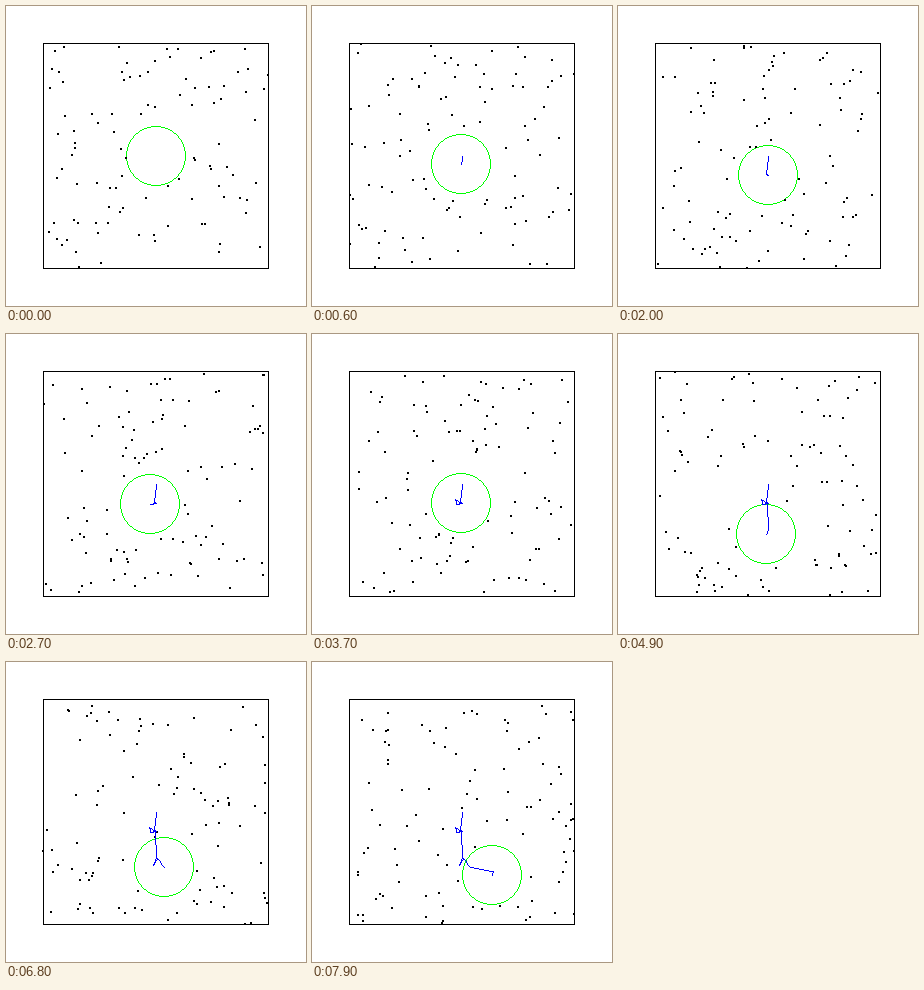
Write a matplotlib script that moves like this. It is 300x300 px and loops after 8000 ms.

```python
import matplotlib.pyplot as plt
import numpy as np
from matplotlib.animation import FuncAnimation
from matplotlib.collections import PolyCollection

SIZE, FRAMES, INTERVAL = 300, 80, 100
LOW, HIGH = 37, 262          # walls of the box
RADIUS, COUNT, SPEED, SUBSTEPS = 30, 100, 3.2, 6

# Main turns of the disc: step, x, y
TURNS = np.array([
    (0, 150, 150), (13, 148, 168), (20, 150, 169), (27, 144, 170),
    (31, 143, 165), (37, 149, 169), (46, 150, 196), (51, 147, 203),
    (60, 151, 196), (68, 158, 205), (77, 181, 209), (79, 180, 213)])


def disc_at(step):
    times, xs, ys = TURNS.T
    return np.array([np.interp(step, times, xs), np.interp(step, times, ys)])


def simulate():
    """Point particles bouncing off the walls and the moving disc."""
    rng = np.random.default_rng(11)
    pos = rng.uniform(LOW, HIGH, (4 * COUNT, 2))
    pos = pos[np.hypot(*(pos - disc_at(0)).T) > RADIUS][:COUNT]
    vel = rng.normal(0, SPEED, (COUNT, 2))
    history = [pos.copy()]
    dt = 1 / SUBSTEPS
    for i in range(1, (FRAMES - 1) * SUBSTEPS + 1):
        pos = pos + vel * dt
        center = disc_at(i * dt)
        drift = (center - disc_at((i - 1) * dt)) / dt
        offset = pos - center
        dist = np.hypot(*offset.T)
        normal = offset / dist[:, None]
        hit = dist < RADIUS
        pos[hit] = center + normal[hit] * RADIUS
        approach = ((vel - drift) * normal).sum(axis=1)
        bounce = hit & (approach < 0)
        vel[bounce] -= 2 * approach[bounce, None] * normal[bounce]
        vel[pos < LOW] = np.abs(vel[pos < LOW])
        vel[pos > HIGH] = -np.abs(vel[pos > HIGH])
        pos = np.clip(pos, LOW, HIGH)
        if i % SUBSTEPS == 0:
            history.append(pos.copy())
    return history


def squares(points, side=1):
    """Crisp pixel squares with their top left corners at the points."""
    corners = np.array([(0, 0), (1, 0), (1, 1), (0, 1)]) * side
    return np.floor(np.asarray(points) + 0.5)[:, None, :] + corners


def stroke(points):
    """Pixels along a polyline."""
    parts = [np.asarray(points[:1], float)]
    for a, b in zip(points[:-1], points[1:]):
        a, b = np.round(a), np.round(b)
        n = int(np.abs(b - a).max()) + 1
        parts.append(np.linspace(a, b, n))
    return np.concatenate(parts)


def ring():
    """Pixel circle 2 * RADIUS wide, drawn by octants."""
    r = RADIUS - 0.5
    x = np.arange(0.5, r * np.sqrt(0.5) + 0.5)
    y = np.floor(np.sqrt(r ** 2 - x ** 2)) + 0.5
    arc = np.column_stack([x, y])
    arc = np.concatenate([arc, arc[:, ::-1]])
    signs = [(sx, sy) for sx in (1, -1) for sy in (1, -1)]
    return np.concatenate([arc * sign for sign in signs]) - 0.5


fig = plt.figure(figsize=(SIZE / 100, SIZE / 100), dpi=100, facecolor="white")
ax = fig.add_axes([0, 0, 1, 1])
ax.set(xlim=(0, SIZE), ylim=(SIZE, 0))
ax.axis("off")


def layer(verts, color):
    art = PolyCollection(verts, facecolors=color, edgecolors="none",
                         linewidths=0, antialiaseds=False)
    ax.add_collection(art, autolim=False)
    return art


particles = simulate()
path = [disc_at(step) for step in range(FRAMES)]
circle = ring()
walls = [(LOW, LOW), (HIGH, LOW), (HIGH, HIGH), (LOW, HIGH), (LOW, LOW)]

layer(squares(stroke(walls)), "#000000")
disc = layer(squares(circle + path[0]), "#00ff00")
dots = layer(squares(particles[0] - 1, 2), "#000000")
trail = layer(squares(path[:1]), "#0000ff")


def update(step):
    disc.set_verts(squares(circle + np.round(path[step])))
    dots.set_verts(squares(particles[step] - 1, 2))
    trail.set_verts(squares(stroke(path[:step + 1])))
    trail.set_visible(step > 0)
    return disc, dots, trail


anim = FuncAnimation(fig, update, frames=FRAMES, interval=INTERVAL,
                     repeat=True, repeat_delay=0)
plt.show()
```
